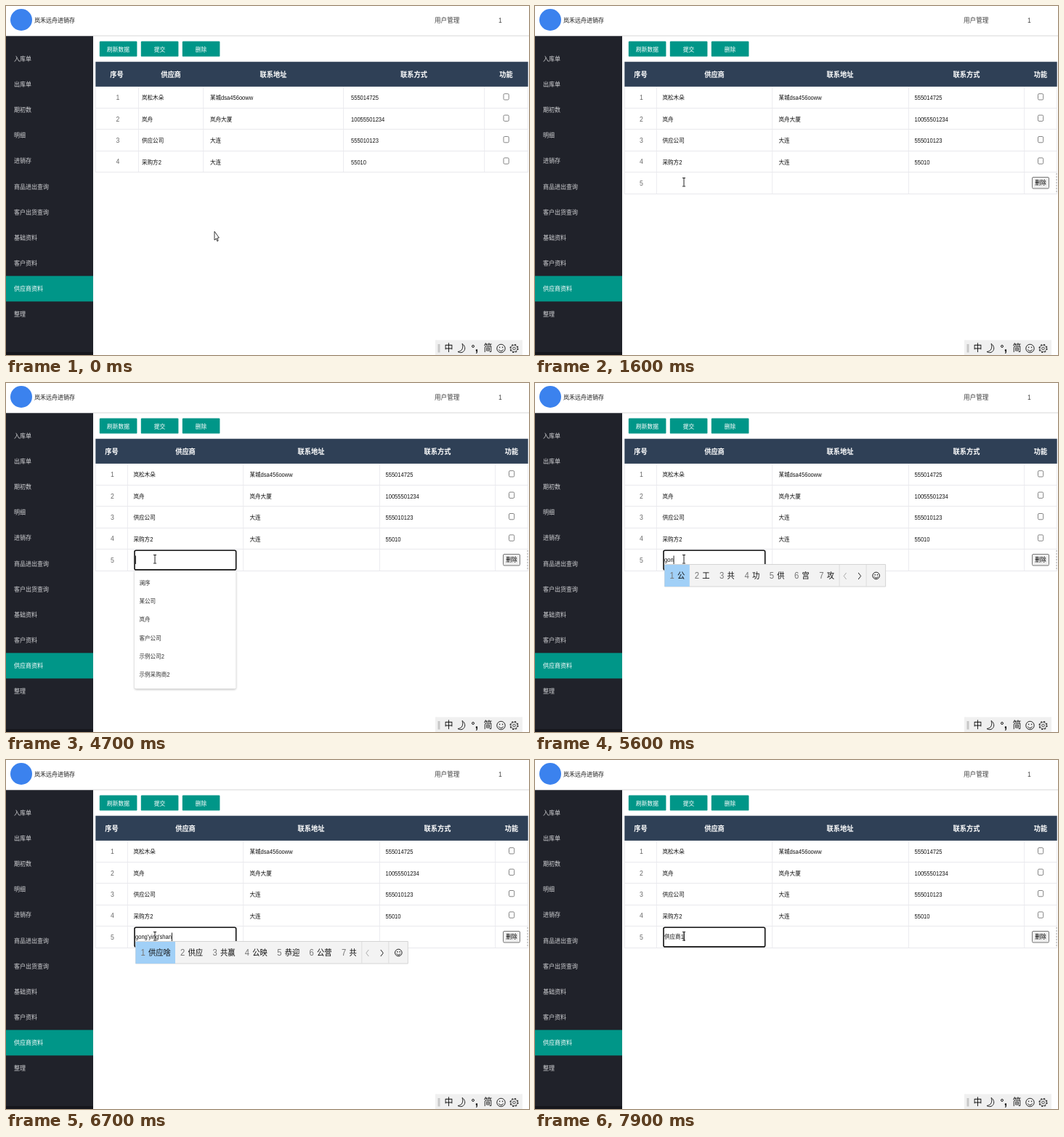
These frames come from a looping animation (720x480 px, 8000 ms). An HTML page with a canvas:

```html
<!DOCTYPE html>
<html lang="zh">
<head>
<meta charset="utf-8">
<style>
html, body { margin: 0; width: 100%; height: 100%; overflow: hidden; background: #fff; }
canvas { display: block; }
</style>
</head>
<body>
<canvas id="stage" width="720" height="480"></canvas>
<script>
const LOOP = 8000;
const SQUEEZE = 0.87;
const FAMILY = '"Liberation Sans", "Noto Sans CJK SC", "Noto Sans CJK", sans-serif';
const TEAL = '#009688';
const ROW_TOP = 111, ROW_H = 29.4;

const MENU = ['入库单', '出库单', '期初数', '明细', '进销存', '商品进出查询', '客户出货查询',
  '基础资料', '客户资料', '供应商资料', '整理'];
const ACTIVE_ITEM = 9;
const HEADERS = ['序号', '供应商', '联系地址', '联系方式', '功能'];
const ROWS = [
  ['岚松木朵', '某城dsa456ooww', '555014725'],
  ['岚舟', '岚舟大厦', '10055501234'],
  ['供应公司', '大连', '555010123'],
  ['采购方2', '大连', '55010'],
];
const SUGGESTIONS = ['澜序', '某公司', '岚舟', '客户公司', '示例公司2', '示例采购商2'];

const NARROW = { edges: [123.5, 182.5, 271.5, 464.5, 658.5, 718.5], heads: [152.5, 227, 368, 561.5, 688.5],
  number: 154, cells: [187, 281, 475], box: 688.5 };
const WIDE = { edges: [123.5, 167.5, 326.5, 514.5, 673.5, 718.5], heads: [145.5, 247, 420, 594, 696],
  number: 146.5, cells: [175.5, 335.5, 522.5], box: 696 };

const ROW_ADDED = 800, FOCUSED = 1650, SUGGEST_END = 5500;
const SINGLE = '公 工 共 功 供 宫 攻';
const PAIRS = '工艺 公益 公义 巩义 公议 工衣 共一';
const YING = '供应 共赢 公映 恭迎 公营 供 共';
// [time, text in the field, input method candidates]
const TYPING = [
  [FOCUSED, ''],
  [5400, 'g', '个 给 过 国 该 高 跟'],
  [5500, 'go', SINGLE],
  [5600, 'gon', SINGLE],
  [5700, 'gong', SINGLE],
  [6000, "gong'y", PAIRS],
  [6200, "gong'yi", PAIRS],
  [6300, "gong'yin", '共饮 公音 工银 共 公 工 供'],
  [6400, "gong'ying", YING],
  [6500, "gong'ying's", '供应商 供应 共赢 公映 恭迎 公营 共'],
  [6600, "gong'ying'sh", '供应商 供应 共赢 公映 恭迎 公营 共'],
  [6700, "gong'ying'shan", '供应啥 供应 共赢 公映 恭迎 公营 共'],
  [6800, "gong'ying'shang", '供应商 供应上 供应伤 公映上 共赢上 恭迎上 供应'],
  [7000, '供应商'],
  [7500, '供应商1'],
];
const MOUSE = [[0, 287, 310], [150, 287, 310], [700, 152, 97], [1000, 152, 97], [1500, 205, 242], [LOOP, 205, 242]];

const ctx = document.getElementById('stage').getContext('2d');

function text(str, x, y, size, color, { align = 'left', weight = 400 } = {}) {
  ctx.save();
  ctx.translate(x, y);
  ctx.scale(SQUEEZE, 1);
  ctx.font = `${weight} ${size}px ${FAMILY}`;
  ctx.textRendering = 'geometricPrecision';
  ctx.textAlign = align;
  ctx.textBaseline = 'middle';
  ctx.fillStyle = color;
  ctx.fillText(str, 0, 0.5);
  const width = ctx.measureText(str).width * SQUEEZE;
  ctx.restore();
  return width;
}

const centered = (str, x, y, size, color, weight) => text(str, x, y, size, color, { align: 'center', weight });

function rect(x, y, w, h, fill) {
  ctx.fillStyle = fill;
  ctx.fillRect(x, y, w, h);
}

function box(x, y, w, h, radius, fill, stroke, lineWidth = 1) {
  ctx.beginPath();
  ctx.roundRect(x, y, w, h, radius);
  ctx.fillStyle = fill;
  ctx.fill();
  if (!stroke) return;
  ctx.strokeStyle = stroke;
  ctx.lineWidth = lineWidth;
  ctx.stroke();
}

function line(points, color, width = 1, dash = []) {
  ctx.beginPath();
  points.forEach(([x, y]) => ctx.lineTo(x, y));
  ctx.setLineDash(dash);
  ctx.strokeStyle = color;
  ctx.lineWidth = width;
  ctx.stroke();
  ctx.setLineDash([]);
}

function arc(x, y, r, from = 0, to = Math.PI * 2, width = 1, dash = []) {
  ctx.beginPath();
  ctx.arc(x, y, r, from, to);
  ctx.setLineDash(dash);
  ctx.strokeStyle = '#222';
  ctx.lineWidth = width;
  ctx.stroke();
  ctx.setLineDash([]);
}

function smiley(x, y, r) {
  arc(x, y, r);
  arc(x, y + 0.5, r * 0.55, 0.3, Math.PI - 0.3);
  rect(x - r * 0.45, y - r * 0.4, 1.3, 1.5, '#222');
  rect(x + r * 0.25, y - r * 0.4, 1.3, 1.5, '#222');
}

function drawFrame() {
  rect(0, 0, 720, 480, '#fff');
  rect(120, 40.5, 600, 1, '#d8d8d8');
  ctx.beginPath();
  ctx.arc(21, 19, 15, 0, Math.PI * 2);
  ctx.fillStyle = '#3b82ee';
  ctx.fill();
  text('岚禾远舟进销存', 39, 20, 9.2, '#222');
  text('用户管理', 590, 19.5, 9.9, '#444');
  text('1', 678, 19.5, 9.9, '#444');

  rect(0, 41.3, 120, 438.7, '#20222a');
  rect(0, 476, 120, 4, '#16171d');
  MENU.forEach((label, i) => {
    const y = 73 + i * 35.1, active = i === ACTIVE_ITEM;
    if (active) rect(0, 371.3, 120, 35.1, TEAL);
    text(label, 11, y, 9.2, active ? '#fff' : '#d0d1d4');
  });

  ['刷新数据', '提交', '删除'].forEach((label, i) => {
    box(128.8 + i * 57, 48.6, 51.6, 21, 1.2, TEAL);
    centered(label, 154.5 + i * 57, 60, 8.9, '#fff');
  });
}

function drawTable(layout, rowCount) {
  const { edges, heads, number, cells, box: boxX } = layout;
  const bottom = ROW_TOP + rowCount * ROW_H;
  rect(123.3, 76.7, 595.4, 34.2, '#2f4056');
  HEADERS.forEach((label, i) => centered(label, heads[i], 95, 10.6, '#fff', 700));
  edges.forEach(x => line([[x, ROW_TOP], [x, bottom]], '#ececf0'));

  for (let i = 0; i < rowCount; i++) {
    const y = 126 + i * ROW_H;
    const lineY = Math.floor(ROW_TOP + (i + 1) * ROW_H) + 0.5;
    line([[123, lineY], [719, lineY]], '#e9e9ed');
    centered(String(i + 1), number, y, 10, '#666');
    if (!ROWS[i]) continue;
    ROWS[i].forEach((value, c) => text(value, cells[c], y + 0.5, 8.7, '#111'));
    box(boxX - 3.5, y - 5.3, 7.2, 8.3, 1.5, '#fff', '#777', 0.9);
  }

  if (rowCount > ROWS.length) {
    line([[718, 230], [718, 257]], '#aaa', 1, [2, 2]);
    box(684.5, 235.5, 23, 15.5, 1.5, '#efefef', '#777');
    centered('删除', 696, 243.5, 8.9, '#000');
  }
}

function drawSuggestions() {
  ctx.save();
  ctx.shadowColor = 'rgba(0,0,0,.3)';
  ctx.shadowBlur = 3;
  ctx.shadowOffsetY = 1;
  box(177, 258, 139.5, 162.5, 2, '#fff');
  ctx.restore();
  SUGGESTIONS.forEach((label, i) => text(label, 183.5, 275 + i * 25.3, 8.7, '#333'));
}

function drawCandidates(words) {
  const widthOf = word => 24.2 + 10.1 * word.length;
  const list = words.split(' ');
  const total = list.reduce((sum, word) => sum + widthOf(word), 0);
  box(178.5, 249.5, total + 65 - 1, 30.5, 0, '#f3f3f3', '#d4d4d4');
  rect(178.5, 250, widthOf(list[0]), 30, '#a1d0f7');
  let x = 178;
  list.forEach((word, i) => {
    text(String(i + 1), x + 7.5, 265, 13, '#777');
    text(word, x + 18, 265, 11.8, '#111');
    x += widthOf(word);
  });
  for (const dx of [1, 38]) line([[x + dx, 250], [x + dx, 280]], '#ddd');
  line([[x + 10.5, 261], [x + 7, 265.5], [x + 10.5, 270]], '#aaa');
  line([[x + 27, 261], [x + 30.5, 265.5], [x + 27, 270]], '#222');
  smiley(x + 51.5, 265, 4.8);
}

function drawField(t) {
  const [since, value, candidates] = TYPING.findLast(step => step[0] <= t);
  if (t < SUGGEST_END) drawSuggestions();
  box(177, 230.2, 139.7, 26.7, 2, '#fff', '#111', 1.6);
  const width = text(value, 178, 243.5, 8.7, '#111');
  if ((t - since) % 1000 < 500) rect(178 + width, 237.5, 0.9, 11.5, '#111');
  if (candidates) drawCandidates(candidates);
}

function drawInputBar() {
  rect(591, 459.5, 120, 20.5, '#f0f0f0');
  rect(594.5, 465, 3, 11.5, '#c8c8c8');
  centered('中', 609.5, 471, 13.8, '#111');
  ctx.beginPath();
  ctx.moveTo(628, 464.5);
  ctx.bezierCurveTo(636, 470, 630, 480, 622, 475.5);
  ctx.bezierCurveTo(628, 475, 630, 470, 628, 464.5);
  ctx.strokeStyle = '#222';
  ctx.lineWidth = 1;
  ctx.stroke();
  arc(643, 468, 1.5);
  centered(',', 648, 470, 18, '#111', 700);
  centered('简', 663.5, 471, 13.8, '#111');
  smiley(681.5, 471, 5.7);
  arc(699.5, 471, 5.4, 0, Math.PI * 2, 1.3, [2.2, 2.04]);
  arc(699.5, 471, 4.5, 0, Math.PI * 2, 0.7);
  arc(699.5, 471, 1.8, 0, Math.PI * 2, 0.8);
}

function mouseAt(t) {
  const i = MOUSE.findIndex(key => key[0] > t);
  const [t0, x0, y0] = MOUSE[i - 1], [t1, x1, y1] = MOUSE[i];
  const p = (t - t0) / (t1 - t0), eased = p * p * (3 - 2 * p);
  return [x0 + (x1 - x0) * eased, y0 + (y1 - y0) * eased];
}

function drawMouse(t) {
  const [x, y] = mouseAt(t);
  ctx.save();
  ctx.translate(x, y);
  if (y < 105 || y > 230 && t > 1000) {
    const color = y < 105 ? '#ddd' : '#222';
    line([[0, -5], [0, 5.5]], color);
    for (const end of [-5.5, 6]) line([[-2, end], [2, end]], color);
  } else {
    const outline = [[0, 0], [0, 12], [2.3, 9.8], [3.8, 13.5], [5.2, 12.8], [3.8, 9.2], [6.3, 8.8]];
    ctx.beginPath();
    outline.forEach(([px, py]) => ctx.lineTo(px, py));
    ctx.closePath();
    ctx.fillStyle = '#fff';
    ctx.fill();
    ctx.strokeStyle = '#222';
    ctx.lineWidth = 0.9;
    ctx.stroke();
  }
  ctx.restore();
}

function draw(now) {
  const t = now % LOOP;
  const added = t >= ROW_ADDED;
  drawFrame();
  drawTable(added ? WIDE : NARROW, added ? 5 : 4);
  if (t >= FOCUSED) drawField(t);
  drawInputBar();
  drawMouse(t);
}

const start = performance.now();
function tick() {
  draw(performance.now() - start);
  requestAnimationFrame(tick);
}
tick();
</script>
</body>
</html>
```
